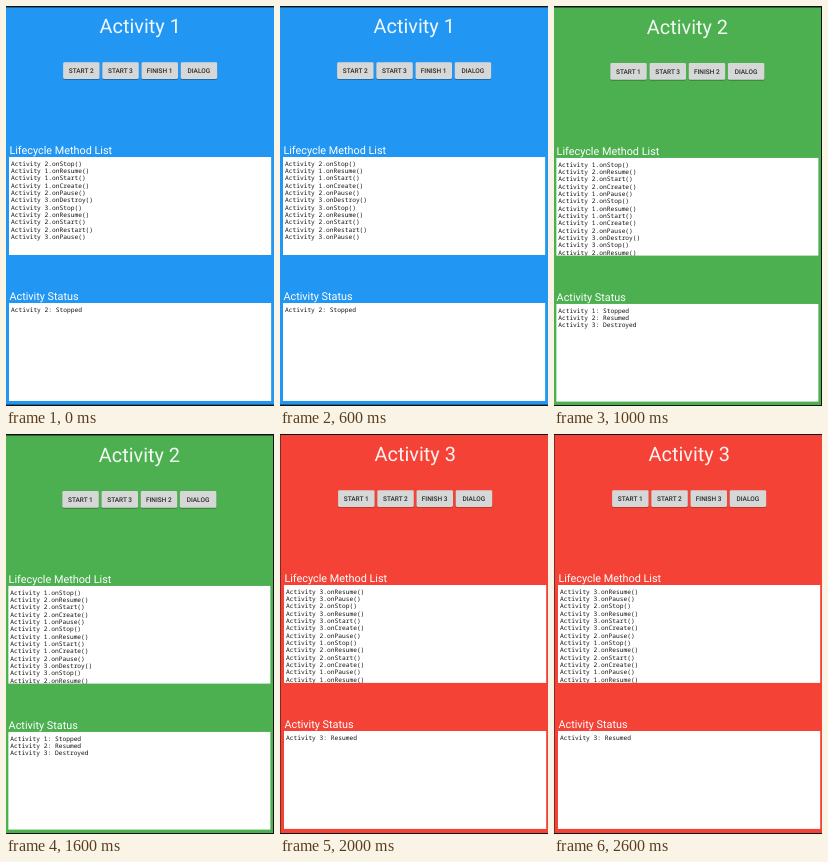
An HTML page for the animation above (3000 ms loop, 268 px wide and 400 px high).

```html
<!DOCTYPE html>
<html lang="en">
<head>
<meta charset="utf-8">
<title>Activity lifecycle</title>
<style>
  html, body { margin: 0; width: 100%; height: 100%; overflow: hidden; background: #000; }
  svg { display: block; }
  text { text-rendering: geometricPrecision; white-space: pre; }
  .title { font: 19.9px Roboto, sans-serif; fill: #fff; fill-opacity: 0.93; text-anchor: middle; }
  .label { font: 10.85px Roboto, sans-serif; fill: #fff; }
  .btn { font: 500 6.5px Roboto, sans-serif; fill: #2a2a2a; text-anchor: middle; }
  .log { font: 6.22px "Noto Sans Mono", "DejaVu Sans Mono", monospace; fill: #111; }
</style>
</head>
<body>
<svg id="stage" width="268" height="400" viewBox="0 0 268 400"></svg>
<script>
const STEP = 1000;
const LINE = 7.33;
const PANEL = { width: 262.4, height: 98 };

// Each log entry is "<activity><method>"; edges are left, top, right, bottom.
const screens = [
  {
    id: 1, color: '#2196f3', dx: 0, dy: 0, edges: [0, 1.4, 268, 398.6],
    buttons: ['START 2', 'START 3', 'FINISH 1', 'DIALOG'],
    log: '2Stop 1Resume 1Start 1Create 2Pause 3Destroy 3Stop 2Resume 2Start 2Restart 3Pause',
    status: ['2: Stopped']
  },
  {
    id: 2, color: '#4caf50', dx: -0.8, dy: 0.8, edges: [0, 1.5, 267, 399],
    buttons: ['START 1', 'START 3', 'FINISH 2', 'DIALOG'],
    log: '1Stop 2Resume 2Start 2Create 1Pause 2Stop 1Resume 1Start 1Create 2Pause 3Destroy 3Stop 2Resume',
    status: ['1: Stopped', '2: Resumed', '3: Destroyed']
  },
  {
    id: 3, color: '#f44336', dx: 1, dy: -0.1, edges: [0.5, 1, 268, 399],
    buttons: ['START 1', 'START 2', 'FINISH 3', 'DIALOG'],
    log: '3Resume 3Pause 2Stop 3Resume 3Start 3Create 2Pause 1Stop 2Resume 2Start 2Create 1Pause 1Resume',
    status: ['3: Resumed']
  }
];

const stage = document.getElementById('stage');

function add(parent, tag, attrs, content) {
  const node = document.createElementNS('http://www.w3.org/2000/svg', tag);
  for (const key in attrs) node.setAttribute(key, attrs[key]);
  if (content) node.textContent = content;
  return parent.appendChild(node);
}

function addButton(parent, caption, i) {
  const x = 57.1 + i * 39.2;
  add(parent, 'rect', { x, y: 56.9, width: 36.5, height: 17, rx: 1.4, fill: '#000', opacity: 0.28 });
  add(parent, 'rect', { x, y: 56.3, width: 36.5, height: 16.7, rx: 1.4, fill: '#d6d7d7' });
  add(parent, 'text', { class: 'btn', x: x + 18.1, y: 67.2 }, caption);
}

function addPanel(parent, label, y, lines) {
  add(parent, 'text', { class: 'label', x: 3.4, y: y - 3 }, label);
  const box = add(parent, 'svg', { x: 3, y, ...PANEL, overflow: 'hidden' });
  add(box, 'rect', { ...PANEL, fill: '#fff' });
  lines.forEach((line, i) =>
    add(box, 'text', { class: 'log', x: 2, y: 8.8 + i * LINE }, 'Activity ' + line));
}

function addScreen(s, i) {
  const [left, top, right, bottom] = s.edges;
  const screen = add(stage, 'g', {});
  add(screen, 'rect', { width: 268, height: 400, fill: '#111' });
  add(screen, 'rect', { x: left, y: top, width: right - left, height: bottom - top, fill: s.color });

  const page = add(screen, 'g', { transform: `translate(${s.dx} ${s.dy})` });
  add(page, 'text', { class: 'title', x: 134.2, y: 26.8 }, 'Activity ' + s.id);
  s.buttons.forEach((caption, n) => addButton(page, caption, n));
  const calls = s.log.split(' ').map(c => `${c[0]}.on${c.slice(1)}()`);
  addPanel(page, 'Lifecycle Method List', 151, calls);
  addPanel(page, 'Activity Status', 297, s.status);

  const frames = screens.map((_, n) => ({
    visibility: n === i ? 'visible' : 'hidden',
    offset: n / screens.length,
    easing: 'step-end'
  }));
  frames.push({ ...frames[0], offset: 1 });
  return screen.animate(frames, { duration: STEP * screens.length, iterations: Infinity });
}

const start = document.timeline.currentTime;
screens.map(addScreen).forEach(a => { a.startTime = start; });
</script>
</body>
</html>
```
